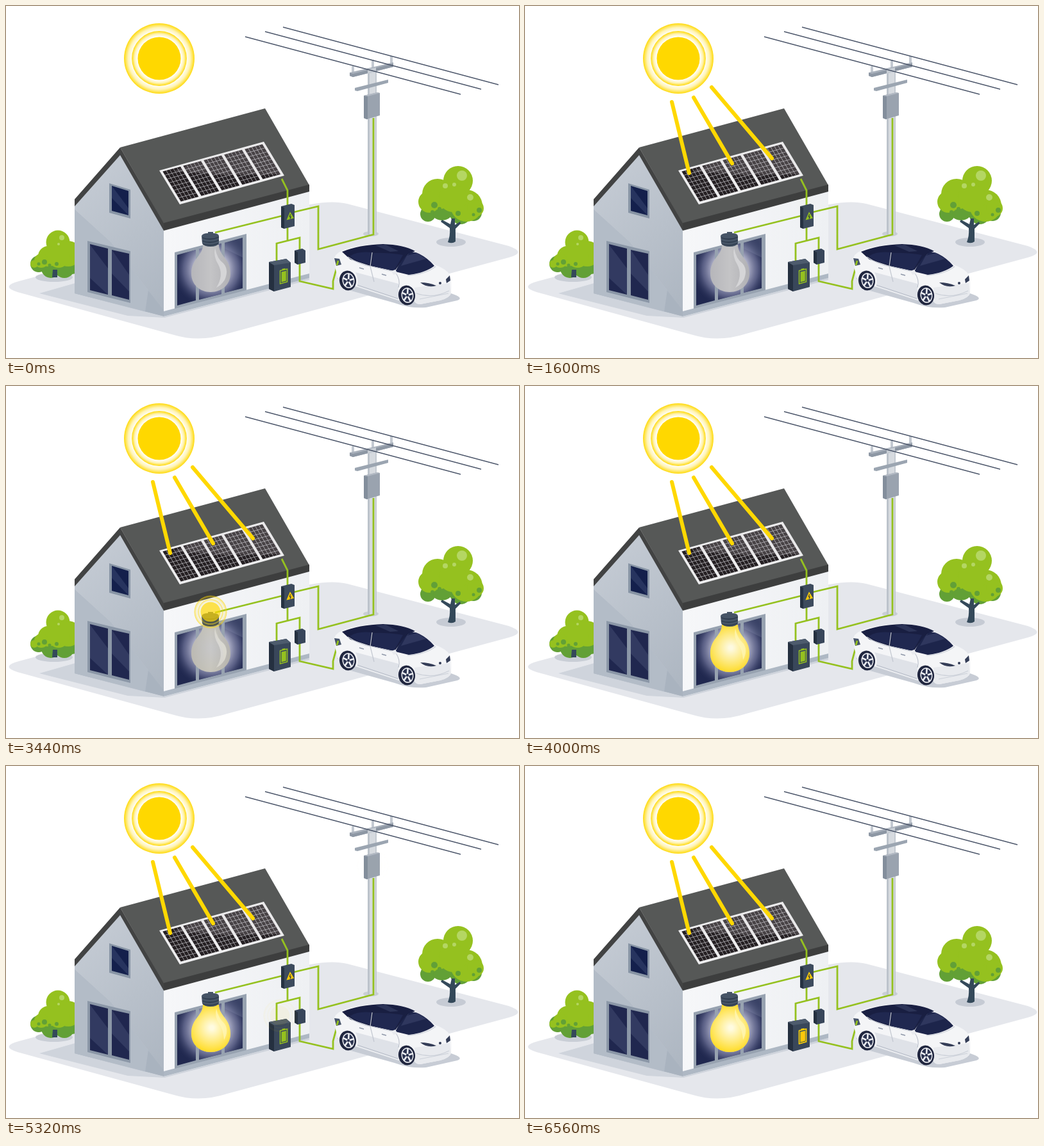
Recreate the animation shown at these times as an HTML page with a canvas. Size 800 px wide and 550 px high, loop 8 s.

```html
<!DOCTYPE html>
<html lang="en">
<head>
<meta charset="utf-8">
<title>Solar home energy</title>
<style>
html, body { margin: 0; width: 100%; height: 100%; overflow: hidden; background: #fff; }
canvas { display: block; }
</style>
</head>
<body>
<canvas id="stage" width="800" height="550"></canvas>
<script>
const LOOP = 8000;
const YELLOW = '#ffd800', LIME = '#95c11f', LEAF = '#62a036', NAVY = '#1c2450';
const stage = document.getElementById('stage').getContext('2d');
const backdrop = document.createElement('canvas');
backdrop.width = 800;
backdrop.height = 550;
let c = backdrop.getContext('2d');

function fill(d, color) {
  c.fillStyle = color;
  c.fill(new Path2D(d));
}
function line(d, color, width) {
  c.strokeStyle = color;
  c.lineWidth = width;
  c.stroke(new Path2D(d));
}
function oval(x, y, rx, ry, color, turn = 0) {
  c.fillStyle = color;
  c.beginPath();
  c.ellipse(x, y, rx, ry, turn, 0, Math.PI * 2);
  c.fill();
}
const dot = (x, y, r, color) => oval(x, y, r, r, color);
const dots = (list, color) => list.forEach(([x, y, r]) => dot(x, y, r, color));

function linear(x0, y0, x1, y1, ...colors) {
  const g = c.createLinearGradient(x0, y0, x1, y1);
  colors.forEach((s, i) => g.addColorStop(i / (colors.length - 1), s));
  return g;
}
function radial(x, y, r0, r1, ...colors) {
  const g = c.createRadialGradient(x, y, r0, x, y, r1);
  colors.forEach((s, i) => g.addColorStop(i / (colors.length - 1), s));
  return g;
}
function faded(alpha, draw) {
  if (alpha <= 0) return;
  c.save();
  c.globalAlpha = alpha;
  draw();
  c.restore();
}

// Disc with two halo bands; the small pulses reuse it.
function sun(x, y, r) {
  const band = (a, b) => {
    c.fillStyle = radial(x, y, r * a, r * b, 'rgba(255,216,0,0)', 'rgba(255,216,0,.28)', 'rgba(255,216,0,.95)');
    c.beginPath();
    c.arc(x, y, r * b, 0, 7);
    c.arc(x, y, r * a, 7, 0, true);
    c.fill();
  };
  band(.76, 1);
  band(.61, .78);
  dot(x, y, r * .61, YELLOW);
}

function ground() {
  fill('M20 430L440 318Q500 301 532 309L784 375Q813 385 784 393L345 512Q302 526 262 514L18 447Q-10 438 20 430Z', '#e5e7ec');
  fill('M52 449L108 433L250 470L473 417L473 428L247 487L190 484Z', '#cfd4dc');
}

function bush() {
  oval(75, 424, 29, 7, '#c9ced6');
  dots([[51, 403, 13], [70, 410, 15], [91, 409, 16], [103, 404, 15]], LEAF);
  dots([[81, 369, 18.5], [66, 391, 16], [55, 398, 11], [97, 387, 20], [82, 392, 17], [44, 403, 6]], LIME);
  dots([[87, 362, 4], [82, 372, 2]], '#b4d663');
  dots([[60, 400, 4], [68, 405, 2.5], [51, 403, 2.5], [79, 403, 3]], LEAF);
  fill('M73 412L80 412L80 424L72 424Z', '#34495a');
}

function tree() {
  oval(694, 369, 23, 7, '#c6cbd4');
  dots([[658, 325, 12], [680, 316, 19], [709, 324, 17], [729, 323, 13]], LEAF);
  dots([[705, 273, 23], [673, 294, 24], [660, 306, 17], [718, 312, 25], [732, 316, 13], [697, 300, 22]], LIME);
  dots([[711, 265, 8], [685, 281, 4], [724, 299, 5], [699, 279, 3]], '#b4d663');
  dots([[668, 311, 5], [676, 317, 3], [665, 322, 3], [738, 319, 4], [729, 326, 2.5], [705, 324, 4]], LEAF);
  fill('M692 347L678 337L680 334L693 341L695 332L700 332L700 342L708 337L709 340L701 348L701 368Q696 372 689 369Q693 359 692 347Z', '#34495a');
}

function walls() {
  fill('M107 308L178 230L247 344L247 485L107 449Z', linear(107, 300, 247, 460, '#c2c9d2', '#aeb7c2'));
  fill('M107 318L163 369L247 477V485L107 449Z', '#a9b3bf');
  fill('M107 318L163 369L222 444L217 478L107 449Z', 'rgba(190,198,208,.45)');
  fill('M246 348L473 287V425L246 485Z', linear(246, 0, 473, 0, '#f6f7f9', '#eef0f3'));
  fill('M246 477L473 418V425L246 485Z', '#aeb8c4');
}

function windows() {
  fill('M161 277L194 287V332L161 323Z', '#8895a5');
  fill('M165 281L191 289V327L165 320Z', '#14204c');
  fill('M165 281L191 316V327L165 300Z', '#27345f');
  fill('M127 367L194 383V464L127 447Z', '#8b97a7');
  fill('M131 372L159 379V451L131 444Z', '#20274f');
  fill('M165 381L192 387V459L165 452Z', '#20274f');
  fill('M131 373L159 410V451L131 425Z', 'rgba(105,116,153,.25)');
  fill('M165 381L192 420V446L165 418Z', 'rgba(105,116,153,.25)');

  fill('M263 385L375 356V444L263 473Z', '#97a2b0');
  const panes = 'M267 389L296 381V460L267 468ZM301 380L336 371V450L301 459ZM341 370L369 362V441L341 448Z';
  fill(panes, '#20284f');
  fill(panes, radial(320, 411, 24, 62, 'rgba(230,230,245,.85)', 'rgba(145,148,185,.5)', 'rgba(32,40,79,0)'));
  fill('M341 370L369 362V393L341 379Z', 'rgba(150,160,185,.22)');
}

function roof() {
  fill('M178 221L404 160L473 280L246 340Z', '#565857');
  fill('M246 339L473 279V290L246 351Z', '#3d3e3e');
  fill('M178 221L107 302V313L178 233L246 351V339Z', '#424343');
}

function panels() {
  fill('M239 257L402 212L434 265L271 310Z', '#eeeeef');
  c.save();
  c.transform(163, -44.5, 32, 53, 239, 256.6);
  for (let i = 0; i < 5; i++) {
    const x = i * .196 + .022, w = .17;
    c.fillStyle = '#241f22';
    c.fillRect(x, .055, w, .885);
    c.fillStyle = 'rgba(215,215,220,.72)';
    for (let k = 1; k < 5; k++) c.fillRect(x + w * k / 5 - .0025, .055, .005, .885);
    for (let k = 1; k < 8; k++) c.fillRect(x, .055 + .885 * k / 8 - .007, w, .014);
  }
  c.restore();
  fill('M301 241L402 214L431 263L340 264L262 258Z', 'rgba(210,205,210,.2)');
}

function pole() {
  oval(569, 356, 12, 4, '#c9ced5');
  fill('M564 98L578 95V357L564 357Z', '#d6dadf');
  fill('M564 98H567V357H564Z', '#bcc3cb');
  fill('M576 95H578V357H576Z', '#c4cad1');
  fill('M539 94H543V106H539ZM570 84H574V97H570ZM599 78H603V91H599Z', '#c3c9d1');
  fill('M536 104L604 88V95L541 111L536 109Z', '#a8b0bb');
  fill('M536 104L541 106V111L536 109ZM541 106L604 90V95L541 111Z', '#8d97a4');
  fill('M544 128L596 115V120L548 133L544 132Z', '#9ba5b1');
  fill('M564 99L577 96V103L564 106Z', '#c6ccd3');
  fill('M558 140L579 135L583 136V171L562 177L558 175Z', '#9aa3af');
  fill('M558 140L564 141V177L558 175Z', '#838e9c');
  fill('M558 140L579 135L583 136L564 141Z', '#b3bac4');
  line('M373 48L709 138M404 40L741 130M432 33L768 123', '#4c566a', 1.3);
}

function wiring() {
  c.lineJoin = 'miter';
  line('M430 270L439 288V314M430 328L326 354M449 322L487 313V380L573 357V175', LIME, 2.8);
  line('M439 344V367M422 400V371L458 362V384M458 400V430L510 442V430L518 400', LIME, 2.8);
}

function boxes() {
  fill('M429 313L445 309L450 311V344L434 348L429 346Z', '#3d4b5d');
  fill('M429 313L434 315V348L429 346Z', '#263242');
  fill('M410 400L437 395L444 401V439L418 446L410 442Z', '#39475a');
  fill('M410 400L418 405V446L410 442Z', '#253040');
  fill('M410 400L437 395L444 401L418 405Z', '#4d5b6d');
  fill('M450 382L462 379L467 382V401L455 404L450 401Z', '#38465a');
  fill('M450 382L455 385V404L450 401Z', '#253040');
}

function wheel(x, y) {
  oval(x, y, 13, 15.5, '#20263f', -.15);
  oval(x + 1, y, 9.5, 12, '#e9ebef', -.15);
  oval(x + 1, y, 8, 10.3, '#2b3350', -.15);
  for (let i = 0; i < 5; i++) {
    const a = i * Math.PI * .4 - 1.5;
    line(`M${x + 1} ${y}L${x + 1 + Math.cos(a) * 9} ${y + Math.sin(a) * 11}`, '#eef0f4', 2.6);
  }
  dot(x + 1, y, 2.2, '#2b3350');
}

function car() {
  fill('M516 425L560 425L694 449Q715 456 704 460L655 471Q630 473 606 464L535 444Z', '#c7ccd5');
  fill('M512 393Q516 384 530 380Q557 371 588 372Q620 373 638 383Q652 390 668 404Q687 411 692 420Q696 431 694 449Q692 456 677 460L646 466Q636 467 636 455L612 460L545 438L519 428Q513 414 512 393Z', '#f4f5f7');
  fill('M545 416L612 434L612 459L548 438Q550 425 545 416Z', '#dfe2e8');
  fill('M637 440L692 433L694 449Q692 456 677 460L646 466Q637 467 637 455Z', '#e8eaee');
  fill('M524 384Q550 373 588 372Q620 373 638 383L627 388Q616 400 606 414L568 406L537 396Z', '#191f42');
  fill('M536 391Q548 383 570 385L568 404Q549 401 536 391ZM573 386Q593 385 619 389L605 414L570 406Z', '#202850');
  fill('M607 415Q616 396 629 386Q637 383 644 387Q658 394 668 406Q654 417 628 420Z', '#1d254b');
  fill('M625 390L641 386L655 395L616 406Z', 'rgba(80,91,130,.35)');
  fill('M576 374L592 373L612 383L599 384Z', 'rgba(90,100,140,.3)');
  line('M571 385L568 407L574 431M533 392Q551 404 570 407L608 416', '#c3c8d1', 1.2);
  line('M548 436L611 457M607 416Q616 428 612 440', '#b4bac6', 1);
  line('M626 421Q655 419 670 407M640 449Q665 458 691 445M645 458L690 449', '#ccd1d9', 1.2);
  fill('M646 432Q660 432 671 437Q657 441 646 432ZM686 427L692 421L693 429L687 433Z', '#343d57');
  dot(677, 433, 2, '#343d57');
  line('M551 409L558 411M586 419L593 421', '#8e97a8', 1.5);
  fill('M601 414L607 412L611 418L604 420Z', '#e9ebef');
  fill('M512 394L520 395L523 404L515 406Z', '#46536a');
  line('M518 398L516 405', LIME, 2.8);
  wheel(533, 429);
  wheel(625, 452);
}

const GLASS = 'M307 373C307 391 289 394 289 418C289 435 302 447 319 447C337 447 350 435 350 418C350 394 332 391 332 373Z';
function bulb(lit) {
  fill(GLASS, linear(289, 0, 350, 0, '#b6b6ba', '#c4c4c6', '#b1b1b5'));
  fill('M326 378Q329 395 339 402Q348 412 341 428Q335 437 328 440Q340 421 331 404Q323 391 326 378Z', '#d5d5d7');
  faded(lit, () => {
    fill(GLASS, radial(321, 409, 3, 38, '#fffbe0', '#ffec86', '#ffdc27'));
    fill('M328 379Q331 394 341 403Q348 414 340 428Q339 411 332 402Q325 392 328 379Z', 'rgba(255,248,190,.7)');
  });
  fill('M305 359Q307 355 315 355V353H323V355Q331 355 332 359V371Q329 376 319 376Q309 376 306 371Z', '#465466');
  line('M306 362Q319 367 332 361M306 367Q319 372 332 366M307 372Q319 376 331 371', '#293647', 1.3);
}

function warning(color) {
  fill('M443 321.5L449 331.5L437.5 334.5Z', color);
  line('M443.5 325.5L442.3 329.2H444.2L443 332.5', '#263242', 1.1);
}
function battery(color) {
  line('M427.5 413.5L438.5 411V431L427.5 434Z', color, 1.5);
  fill('M429.5 415.5L436.8 413.8V429.5L429.5 431.5ZM430.5 410.8L435.5 409.7V411.5L430.5 412.8Z', color);
}

const unit = x => Math.max(0, Math.min(1, x));
function ease(t, from, to) {
  const x = unit((t - from) / (to - from));
  return x * x * (3 - 2 * x);
}
// Fades in over one interval and out over another.
const pulse = (t, a, b, d, e) => ease(t, a, b) * (1 - ease(t, d, e));

const RAYS = [
  { path: 'M229 150L256 261', spot: [268, 280], end: 1360 },
  { path: 'M263 143L323 246', spot: [335, 262], end: 1360 },
  { path: 'M291 127L385 238', spot: [385, 238], end: 840 }
];
const PULSES = [
  { at: [438, 311], time: [1560, 2320, 2440, 2820] },
  { at: [319, 353], time: [2600, 3200, 3280, 3720] },
  { at: [427, 390], time: [4100, 4820, 4960, 5390] },
  { at: [572, 156], time: [5300, 5760, 5800, 6540] }
];

function paint(t) {
  c.clearRect(0, 0, 800, 550);
  c.drawImage(backdrop, 0, 0);
  c.lineCap = 'round';
  for (const { path, spot, end } of RAYS) {
    faded(pulse(t, 0, end * .5, end * .5, end) * .5, () => sun(...spot, 26));
    faded(ease(t, 0, end), () => line(path, YELLOW, 6));
  }
  c.lineCap = 'butt';
  bulb(ease(t, 3320, 4080));
  const states = [[warning, 2640, 3240], [battery, 5300, 5760]];
  for (const [icon, from, to] of states) {
    icon(LIME);
    faded(ease(t, from, to), () => icon('#ffc80a'));
  }
  for (const { at, time } of PULSES) faded(pulse(t, ...time), () => sun(...at, 25.5));
}

[ground, bush, tree, walls, windows, roof, panels, pole, wiring, boxes, car].forEach(draw => draw());
sun(239, 82, 55);
c = stage;

const start = performance.now();
function tick() {
  paint((performance.now() - start) % LOOP);
  requestAnimationFrame(tick);
}
tick();
</script>
</body>
</html>
```
